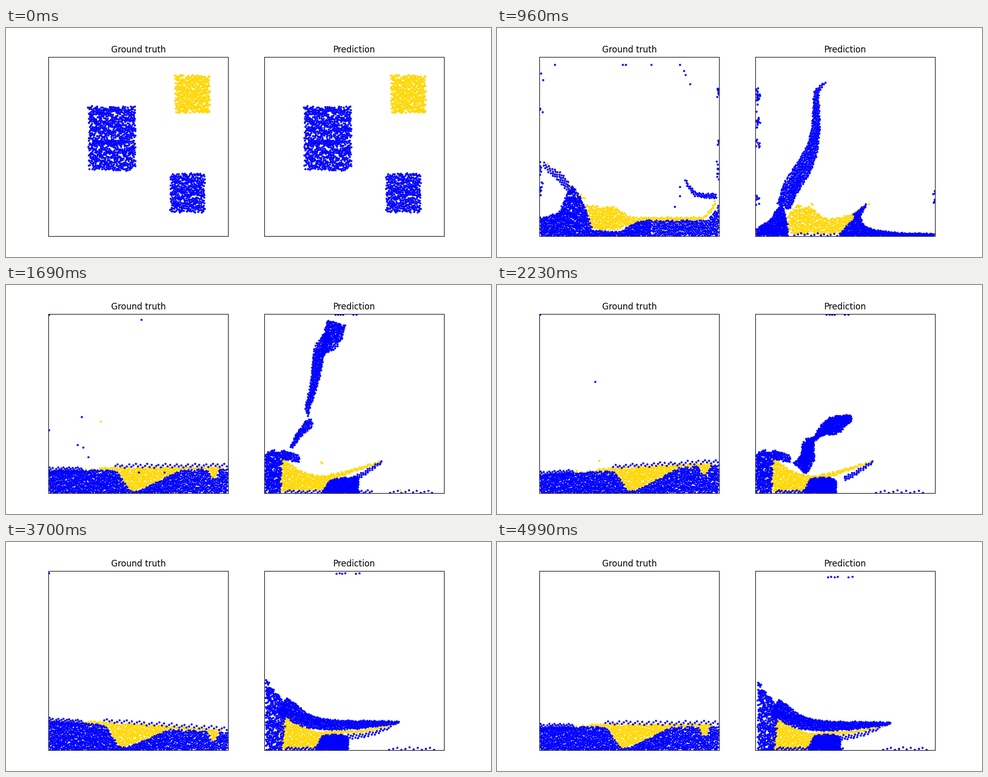
Animation, 950 px wide and 450 px high, one loop 5.03 s. Source, as a matplotlib script:

```python
import numpy as np
import matplotlib.pyplot as plt
from matplotlib.animation import FuncAnimation

W, H, DPI = 950, 450, 100
FRAMES, LOOP = 141, 5030
TOP, FLOOR, SIDE = 56.53, 408.8, 352.27
G = 1.35  # gravity, px per frame squared
SPLASH, RISE, DROOP, REST, END = 27, 47, 62, 87, 140
BLUE, GOLD = "blue", "gold"

steps = np.arange(FRAMES)
rng = np.random.default_rng(4)


def glide(keys, pos, at):
    """Monotone cubic through key positions."""
    keys = np.array(keys, float)
    h = np.diff(keys)[:, None, None]
    s = np.diff(pos, axis=0) / h
    prod = s[:-1] * s[1:]
    d = np.zeros_like(pos)
    d[0] = s[0]
    d[1:-1] = np.where(prod > 0, 2 * prod / np.where(prod > 0, s[:-1] + s[1:], 1), 0)
    k = np.clip(at, keys[0], keys[-1])
    i = np.clip(np.searchsorted(keys, k, "right") - 1, 0, len(keys) - 2)
    w = h[i]
    t = (k - keys[i])[:, None, None] / w
    return (pos[i] * (1 + 2 * t) * (1 - t) ** 2 + d[i] * w * t * (1 - t) ** 2
            + pos[i + 1] * t * t * (3 - 2 * t) + d[i + 1] * w * t * t * (t - 1))


def curve(pts):
    pts = np.array(pts, float)
    n = len(pts)
    return glide(range(n), pts[:, None], np.linspace(0, n - 1, 12 * n))[:, 0]


# A strip is a row of rungs (x0, y0, x1, y1).
def layer(*pts):
    """Strip between top and bottom heights; (x, top) reaches the floor."""
    x, top, bottom = curve([(*p, FLOOR)[:3] for p in pts]).T
    return np.stack([x, top, x, bottom], 1)


def tube(*pts):
    """Strip of varying width along a centre line of (x, y, width)."""
    x, y, w = curve(pts).T
    tx, ty = np.gradient(x), np.gradient(y)
    n = w / 2 / (np.hypot(tx, ty) + 1e-9)
    return np.stack([x + ty * n, y - tx * n, x - ty * n, y + tx * n], 1)


def puddle(x0, x1):
    return tube((x0, 406, 6), (x1, 406, 6))


def shift(strip, dx, dy):
    return strip + [dx, dy, dx, dy]


def relax(p, gap):
    p = p.astype(np.float32)
    for _ in range(9):
        dx = p[:, 0, None] - p[None, :, 0]
        dy = p[:, 1, None] - p[None, :, 1]
        dist = np.sqrt(dx * dx + dy * dy) + 1e-3
        push = 0.25 * np.clip(gap / dist - 1, 0, 4)
        move = np.stack([(dx * push).sum(1), (dy * push).sum(1)], 1)
        p = p + np.clip(move, -1, 1)
    return p


def fill(strip, u, v):
    """Place points in a strip with equal density along it."""
    a, b = strip[:-1], strip[1:]
    d1, d2 = b[:, 2:] - a[:, :2], b[:, :2] - a[:, 2:]
    area = np.abs(d1[:, 0] * d2[:, 1] - d1[:, 1] * d2[:, 0]) / 2
    cum = np.r_[0, np.cumsum(area)]
    x0, y0, x1, y1 = (np.interp(u, cum / cum[-1], c) for c in strip.T)
    p = np.stack([x0 + (x1 - x0) * v, y0 + (y1 - y0) * v], 1)
    return relax(p, min(3.3, np.sqrt(cum[-1] / len(u))))


class Panel:
    def __init__(self, fig, left, title):
        self.left = left
        rect = [left / W, 1 - FLOOR / H, SIDE / W, (FLOOR - TOP) / H]
        self.ax = fig.add_axes(rect, xlim=(left, left + SIDE), ylim=(FLOOR, TOP),
                               xticks=[], yticks=[])
        self.ax.set_title(title)
        self.tracks = {GOLD: [], BLUE: []}
        self.dots = {c: self.ax.plot([], [], "o", ms=2, color=c)[0] for c in self.tracks}

    def keep(self, color, track):
        lo, hi = [self.left + 1, TOP + 1], [self.left + SIDE - 1, FLOOR - 1]
        self.tracks[color].append(np.clip(track, lo, hi))

    def block(self, block, parts):
        """A block falls freely, lands, then its parts flow through their poses."""
        color, n, (x0, y0, x1, y1), (vx, vy), land = block
        seeded = np.random.default_rng(n)
        u = (np.arange(n) + 0.5) / n
        v = (np.arange(n) * 0.618034 + 0.1 * seeded.random(n)) % 1
        x0, y0, x1, y1 = x0 + self.left, y0, x1 + self.left, y1
        first = fill(layer((x0, y0, y1), (x1, y0, y1)), u, v)
        fall = [land * i / 3 for i in range(4)]
        start = 0
        for count, poses in parts:
            part = slice(start, start + count)
            pu, pv = (np.arange(count) + 0.5) / count, v[part]
            pos = [first[part] + [vx * k, vy * k + G * k * k / 2] for k in fall]
            pos += [fill(strip, pu, pv) for strip in poses.values()]
            self.keep(color, glide(fall + list(poses), np.array(pos), steps))
            start += count

    def drop(self, color, k, x, y, vx=0, v_in=-13, v_out=2):
        """A thrown droplet passing (x, y) at step k."""
        t = steps - k
        fy = y + np.where(t < 0, v_in, v_out) * t + G * t * t / 2
        p = np.stack([x + vx * t, fy], 1)
        p[fy > 385] = np.nan
        self.keep(color, p[:, None])

    def wall(self, x, clusters):
        """Spray on a wall, in clusters of (height, count)."""
        for y, n in clusters:
            for dx, dy in rng.normal(0, (2.5, 8), (n, 2)):
                self.drop(BLUE, SPLASH, x + dx, y + dy, 0, -9, 3)

    def cling(self, color, first, last, x, y, vx, g):
        """A droplet that hangs almost still."""
        t = steps - first
        p = np.stack([x + vx * t, y + g * t * t / 2], 1)
        p[(t < 0) | (steps > last)] = np.nan
        self.keep(color, p[:, None])

    def join(self):
        self.tracks = {c: np.concatenate(t, axis=1) for c, t in self.tracks.items()}

    def show(self, k):
        for c, line in self.dots.items():
            line.set_data(*self.tracks[c][k].T)
        return list(self.dots.values())


fig = plt.figure(figsize=(W / DPI, H / DPI), dpi=DPI, facecolor="white")
truth = Panel(fig, 83, "Ground truth")
guess = Panel(fig, 83 + 1.2 * SIDE, "Prediction")

# colour, dots, box, speed, landing step
BIG = BLUE, 880, (79, 154, 169.5, 279), (-3, 3), 12
SMALL = BLUE, 405, (239, 286, 305.5, 362), (-1, 3.6), 6
SAND = GOLD, 400, (248.5, 92, 315, 166), (-5, 3), 15


def ramp(x, a, b):
    return np.clip((x - a) / (b - a), 0, 1)


def sea(tilt):
    """Poses of the settled pool: sand in a pit that drifts with the slosh."""
    c = 258 + 1.7 * tilt
    split = c + 78

    def surface(x):
        return 359 - tilt * (x - 259) / 176

    def bed(x):
        pit = 41 * ramp(x, c - 45, c - 18) * ramp(x, c + 85, c)
        pocket = 18 * np.clip(1.5 - np.abs(x - 406) / 8, 0, 1)
        return surface(x) + 4 + pit + pocket

    def span(x0, x1, top, bottom):
        x = np.linspace(x0, x1, 60)
        return np.stack([x, top(x), x, bottom(x)], 1)

    def floor(x):
        return np.full_like(x, FLOOR)

    return {"edge": span(84, 150, lambda x: surface(x) - 2, lambda x: surface(x) + 12),
            "left": span(84, split, bed, floor),
            "right": span(split, 434, bed, floor),
            "crest": span(c - 48, 434, lambda x: surface(x) - 8, surface),
            "film": span(88, c - 75, surface, lambda x: surface(x) + 9),
            "sand": span(c - 75, 422, lambda x: surface(x) - 2, bed)}


slosh = {k: sea(t) for k, t in zip((RISE, DROOP, REST, 104, END), (1, 9, 0, -12, 0))}


def settle(name, splash):
    return {SPLASH: splash} | {k: poses[name] for k, poses in slosh.items()}


truth.block(BIG, [
    (50, settle("edge", tube((88, 265, 6), (125, 296, 16), (140, 316, 12)))),
    (830, settle("left", layer((84, 373), (120, 362), (137, 325), (145, 312), (170, 348),
                               (190, 398), (240, 400), (270, 384), (305, 377))))])
truth.block(SMALL, [
    (355, {14: layer((285, 390), (360, 368), (434, 355))}
     | settle("right", layer((305, 377), (405, 378), (434, 347)))),
    (50, settle("crest", tube((366, 297, 3), (392, 327, 8), (430, 330, 10))))])
truth.block(SAND, [
    (22, settle("film", tube((92, 264, 4), (170, 340, 8)))),
    (378, settle("sand", layer((172, 346, 350), (184, 350, 392), (225, 352, 398),
                               (270, 372, 384), (400, 371, 377), (430, 337, 348))))])

truth.wall(85, [(150, 3), (260, 7), (310, 10)])
truth.wall(434, [(114, 9), (210, 5), (268, 9)])
for x in (113, 252, 302, 358):
    truth.drop(BLUE, SPLASH, x, 58, 0.4)
for x, y in [(366, 70), (369, 78), (378, 96), (86, 75), (90, 88)]:
    truth.drop(BLUE, SPLASH, x, y, 0.4)
for x, y in [(357, 305), (357, 323), (347, 344)]:
    truth.drop(BLUE, SPLASH, x, y, -0.5, -6, -2)
truth.drop(BLUE, SPLASH, 247, 58, 0.9, -13, -13)
truth.drop(BLUE, RISE, 148, 259, 2.9, -14.7, -14.7)
truth.drop(GOLD, RISE, 185, 268, 1, -9, -5)
for x, y in [(84, 285), (140, 314), (151, 319), (161, 338)]:
    truth.drop(BLUE, RISE, x, y, 0.3, -7, -3)
truth.cling(BLUE, 40, 104, 84, 58, -0.01, 0.0015)

stub = layer((507, 335), (520, 324), (536, 328), (541, 324, 342), (574, 334, 348))
bank = layer((508, 268), (522, 288), (537, 303), (546, 320, 338))
arm = tube((540, 319, 36), (590, 349, 26), (640, 357, 20), (700, 356, 15), (768, 352, 5))
guess.block(BIG, [
    (340, {SPLASH: layer((507, 396), (535, 375), (555, 348), (569, 392)),
           RISE: stub, DROOP: stub, REST: bank, END: shift(bank, 3, 6)}),
    (540, {SPLASH: tube((560, 350, 26), (578, 305, 30), (600, 268, 30), (618, 225, 22),
                        (625, 170, 15), (625, 122, 10), (645, 101, 2)),
           RISE: tube((558, 320, 6), (576, 290, 12), (594, 271, 16), (592, 260, 0),
                      (590, 246, 8), (605, 185, 16), (614, 128, 24), (636, 108, 36),
                      (648, 74, 38)),
           DROOP: tube((592, 360, 34), (608, 340, 27), (609, 310, 21), (622, 302, 8),
                       (634, 288, 16), (660, 275, 34), (694, 260, 10)),
           REST: arm, END: shift(arm, 3, 4)})])

mound = layer((605, 404), (622, 379), (655, 378), (668, 386))
tail = tube((680, 382, 10), (737, 347, 5))
tip = tube((668, 383, 11), (725, 372, 8), (757, 360, 4))
guess.block(SMALL, [
    (315, {14: layer((695, 392), (770, 368), (857, 360)),
           SPLASH: layer((668, 405), (690, 380), (705, 366), (714, 388), (760, 400),
                         (857, 405)),
           RISE: layer((620, 404), (640, 381), (670, 378), (690, 378)),
           DROOP: shift(mound, -4, 0), REST: mound, END: shift(mound, 4, 0)}),
    (34, {SPLASH: tube((700, 372, 14), (723, 346, 3)),
          RISE: tail, DROOP: tail, REST: tip, END: shift(tip, -5, 4)}),
    (44, {SPLASH: puddle(575, 857), RISE: puddle(545, 718), DROOP: puddle(545, 664),
          END: puddle(547, 678)}),
    (12, {SPLASH: puddle(800, 857), RISE: puddle(748, 838), DROOP: puddle(738, 838),
          END: puddle(752, 845)})])

bowl = layer((536, 340, 400), (546, 338, 405), (575, 364, 405), (615, 374, 403),
             (642, 370, 382), (735, 345, 349))
wedge = layer((536, 334, 400), (546, 336, 405), (575, 358, 405), (612, 372, 402),
              (632, 370, 378), (700, 367, 372), (770, 350, 355))
guess.block(SAND, [
    (400, {SPLASH: layer((566, 372, 402), (582, 350, 404), (602, 350, 405),
                         (645, 375, 405), (685, 367, 395), (714, 355, 358)),
           RISE: bowl, DROOP: bowl, REST: wedge, END: shift(wedge, 1, 3)})])

guess.wall(510, [(122, 24), (175, 16), (216, 8), (325, 8)])
guess.wall(857, [(328, 6), (380, 5)])
for i, x in enumerate((645, 650, 655, 660, 680, 686)):
    guess.cling(BLUE, RISE, FRAMES, x, 58 - i % 2, 0.03 + i * 0.015, 0.0026)
for x in (616, 618):
    guess.cling(GOLD, 24, 58, x, x - 271, 0.04, 0.012)
for x, y in [(589, 341), (591, 344), (728, 339)]:
    guess.drop(GOLD, SPLASH, x, y, 0.2, -6, -2)
guess.cling(GOLD, 44, FRAMES, 772, 403, 0.15, 0.01)

panels = (truth, guess)
for panel in panels:
    panel.join()


def draw(k):
    return [line for panel in panels for line in panel.show(k)]


anim = FuncAnimation(fig, draw, frames=FRAMES, interval=LOOP / FRAMES,
                     init_func=lambda: draw(0), repeat=True, blit=False)
plt.show()
```
